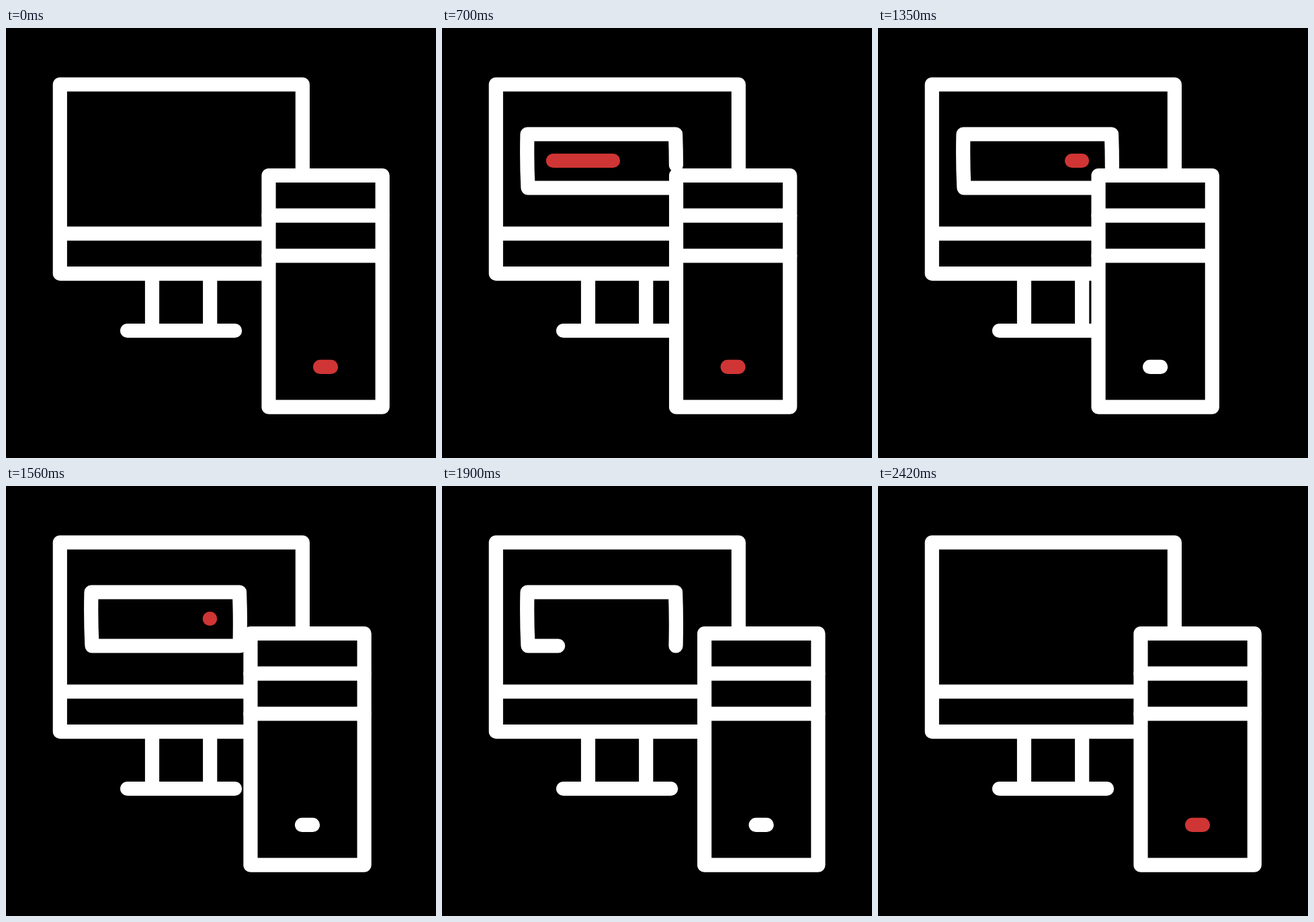
An HTML page for the animation above (2450 ms loop, 640 by 640 pixels).

```html
<!DOCTYPE html>
<html lang="en">
<head>
<meta charset="utf-8">
<title>Desktop computer</title>
<style>
html, body { margin: 0; width: 100%; height: 100%; overflow: hidden; background: #000; }
svg { display: block; width: 100%; height: 100%; }
path { fill: none; stroke: #fff; stroke-width: 21.2; stroke-linecap: round; stroke-linejoin: round; }
#bar { stroke: #cf3535; }
#case { fill: #000; }
</style>
</head>
<body>
<svg viewBox="0 0 640 640">
  <path d="M80.3 84H441.4V365.6H80.3ZM80.3 306H441.4M217.5 365.6V450.5M303.7 365.6V450.5M180.6 450.5H340.6"/>
  <path id="box" d="M348 238H128Q126 198 127 158H347.5Q349 198 348 238"/>
  <path id="bar" d="M165.5 197.5H303.6"/>
  <g id="tower">
    <path id="case" d="M391 219.5H560.3V564.2H391Z"/>
    <path d="M391 279.2H560.3M391 339H560.3"/>
    <path id="light" d="M467.6 504.4H483.6"/>
  </g>
</svg>
<script>
const LOOP = 2450, CYCLE = 490, STEP = 30;
const RED = [207, 53, 53], WHITE = [255, 255, 255];
const [box, bar, tower, light] = ['box', 'bar', 'tower', 'light'].map(id => document.getElementById(id));

// Each move: start, duration, horizontal position of the second ease handle
const moves = {
  boxDraw: [0, 818, 0.667],
  boxErase: [1729, 671, 0.25],
  barDraw: [324, 816, 0.35],
  barErase: [945, 650, 0.22],
  towerOut: [362, 760, 0.3],
  towerBack: [1285, 679, 0.3],
  lightOff: [770, 150, 0.667],
  lightOn: [1960, 150, 0.667]
};

// Cubic bezier (1/3, 0, x2, 1), solved by bisection
function ease(x, x2) {
  if (x <= 0) return 0;
  if (x >= 1) return 1;
  let lo = 0, hi = 1;
  for (let i = 0; i < 24; i++) {
    const u = (lo + hi) / 2, v = 1 - u;
    if (u * v * v + 3 * x2 * u * u * v + u * u * u < x) lo = u;
    else hi = u;
  }
  return lo * lo * (3 - 2 * lo);
}

function progress(name, t) {
  const [start, duration, x2] = moves[name];
  return ease((t - start) / duration, x2);
}

// 15 poses per cycle; the eighth is held for 70 ms
function snap(t) {
  const base = Math.floor(t / CYCLE) * CYCLE, u = t - base;
  const grid = (v, from) => from + Math.floor((v - from) / STEP) * STEP;
  return base + (u < 280 ? Math.min(grid(u, 0), 210) : grid(u, 280));
}

function trim(path, from, to) {
  const length = path.getTotalLength();
  const visible = to > 0 && from < 1 && to >= from;
  path.style.visibility = visible ? 'visible' : 'hidden';
  path.style.strokeDasharray = `${Math.max(0.01, (to - from) * length)} ${length * 2}`;
  path.style.strokeDashoffset = -from * length;
}

function draw(time) {
  const t = snap(time % LOOP);
  const p = name => progress(name, t);
  trim(box, p('boxErase'), p('boxDraw'));
  trim(bar, p('barErase'), p('barDraw'));
  tower.setAttribute('transform', `translate(${65 * (p('towerBack') - p('towerOut'))} 0)`);
  const white = p('lightOff') - p('lightOn');
  const mix = RED.map((c, i) => Math.round(c + (WHITE[i] - c) * white));
  light.style.stroke = `rgb(${mix})`;
}

let origin;
function tick(now) {
  origin ??= now;
  draw(now - origin);
  requestAnimationFrame(tick);
}
draw(0);
requestAnimationFrame(tick);
</script>
</body>
</html>
```
